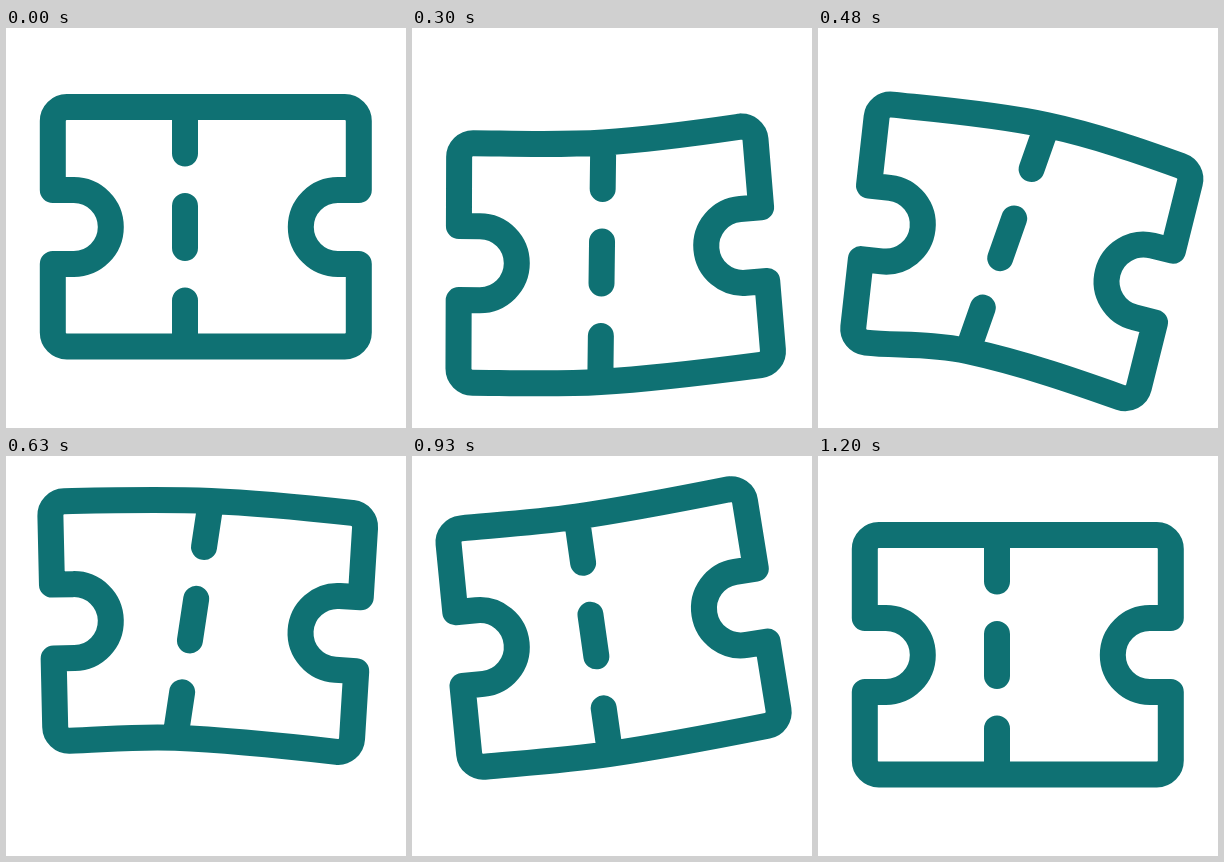
An HTML page with a canvas that plays this animation: 400 by 400 pixels, repeating every 2.23 s.

```html
<!DOCTYPE html>
<html lang="en">
<head>
<meta charset="utf-8">
<title>Ticket</title>
<style>
html, body { margin: 0; width: 100%; height: 100%; overflow: hidden; background: #fff; }
canvas { display: block; width: 100%; height: 100%; }
</style>
</head>
<body>
<canvas id="stage" width="400" height="400"></canvas>
<script>
const ctx = document.getElementById('stage').getContext('2d');
const LOOP = 2230, STEP = 30, END = 1200;
const RAD = Math.PI / 180;
const TOP = -120, BOTTOM = 119.5, NOTCH = 37, LIP = 21, CORNER = 14, SPAN = 264;

// Eased swing from rest through a few [time, value] extremes.
function swing(...peaks) {
  return t => {
    let t0 = 0, v0 = 0;
    for (const [t1, v1] of peaks) {
      if (t < t1) return v0 + (v1 - v0) * (1 - Math.cos(Math.PI * (t - t0) / (t1 - t0))) / 2;
      [t0, v0] = [t1, v1];
    }
    return v0;
  };
}

// Angles in degrees, anticlockwise.
const tilt = swing([150, 20.3], [450, -12.8], [835, 10], [END, 0]);
const lift = swing([160, -14], [375, 43], [745, -48], [1150, 0]);
const bend = swing([240, 9], [500, -10.5], [880, 5], [END, 0]);
const lag = swing([510, -7], [1000, 0]);
const drift = swing([330, 11], [END, 0]);

// A rigid part: maps local points to the stage.
function part(x, y, deg) {
  const s = Math.sin(deg * RAD), c = Math.cos(deg * RAD);
  const at = (px, py) => [x + px * c + py * s, y - px * s + py * c];
  return { x, y, deg, at };
}

const line = p => ctx.lineTo(...p);
const mix = (a, b, u) => [a[0] + (b[0] - a[0]) * u, a[1] + (b[1] - a[1]) * u];
const dist = (a, b) => Math.hypot(b[0] - a[0], b[1] - a[1]);

// Points of a long side, left to right: corner, handles, middle, handles, corner.
function edge(left, mid, right, y) {
  const a = left.at(-LIP, y), m = mid.at(0, y), b = right.at(LIP, y);
  const handle = k => [m[0] + (b[0] - a[0]) * k, m[1] + (b[1] - a[1]) * k];
  const ha = handle(-dist(m, a) / 3 / dist(a, b));
  const hb = handle(dist(m, b) / 3 / dist(a, b));
  return [a, left.at(44 - LIP, y), ha, m, hb, mix(b, hb, 0.5), b];
}

function drawEdge([a, ca, ha, m, hb, cb, b], next) {
  ctx.arcTo(...a, ...ca, CORNER);
  ctx.bezierCurveTo(...ca, ...ha, ...m);
  ctx.bezierCurveTo(...hb, ...cb, ...mix(b, cb, CORNER / dist(b, cb)));
  ctx.arcTo(...b, ...next, CORNER);
}

function notch(p, lip, from) {
  line(p.at(lip, from * NOTCH));
  line(p.at(0, from * NOTCH));
  ctx.arc(p.x, p.y, NOTCH, (from * 90 - p.deg) * RAD, (-from * 90 - p.deg) * RAD, true);
  line(p.at(lip, -from * NOTCH));
}

function draw(t) {
  const c = tilt(t), b = bend(t), x = 67.8, y = 199 + lift(t);
  const sin = Math.sin(c * RAD), cos = Math.cos(c * RAD);
  const left = part(x, y + SPAN / 2 * sin, c - 0.6 * b);
  const right = part(x + SPAN * cos, y - SPAN / 2 * sin, c + 0.15 * b);
  const mid = part(179 + drift(t), y + 21 * sin + b, c + lag(t));

  ctx.fillStyle = '#fff';
  ctx.fillRect(0, 0, 400, 400);
  ctx.strokeStyle = '#0f7173';
  ctx.lineWidth = 26;
  ctx.lineCap = ctx.lineJoin = 'round';

  ctx.beginPath();
  ctx.moveTo(...left.at(-LIP, -NOTCH));
  drawEdge(edge(left, mid, right, TOP), right.at(LIP, -NOTCH));
  notch(right, LIP, -1);
  drawEdge(edge(left, mid, right, BOTTOM).reverse(), left.at(-LIP, NOTCH));
  notch(left, -LIP, 1);
  ctx.closePath();
  for (const [from, to] of [[TOP + 3, -73.5], [-21, 21], [73.5, BOTTOM - 3]]) {
    ctx.moveTo(...mid.at(0, from));
    line(mid.at(0, to));
  }
  ctx.stroke();
}

const start = performance.now();
function frame() {
  const t = (performance.now() - start) % LOOP;
  draw(Math.min(END, Math.floor(t / STEP) * STEP));
  requestAnimationFrame(frame);
}
frame();
</script>
</body>
</html>
```
